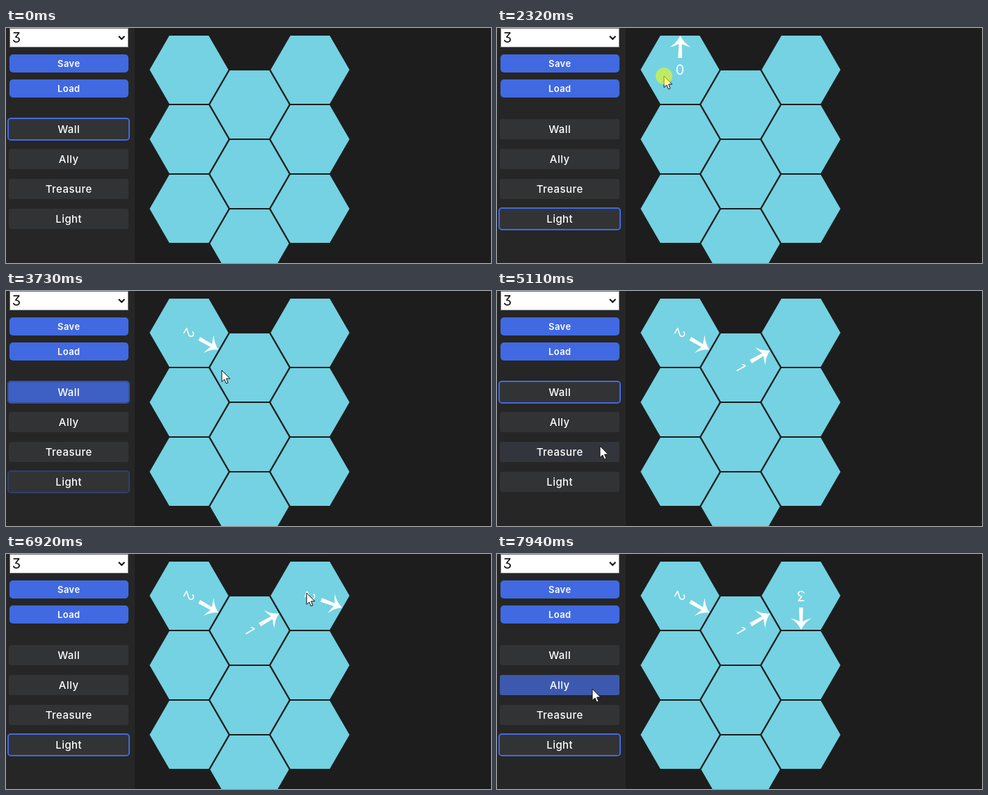
These frames come from a looping animation (697 px wide and 338 px high, 8000 ms). An HTML page:

```html
<!DOCTYPE html>
<html lang="en">
<head>
<meta charset="utf-8">
<title>Hex board editor</title>
<style>
  html, body { margin: 0; width: 100%; height: 100%; overflow: hidden; background: #1d1d1d; }
  svg { display: block; width: 697px; height: 338px; }
  text { font-family: Inter, "Open Sans", sans-serif; font-feature-settings: "cv09"; fill: #fff; text-anchor: middle; }
  .action { font-size: 13px; font-weight: 600; letter-spacing: .45px; }
  .tool { font-size: 15px; font-weight: 500; letter-spacing: .45px; }
  .digit { font-size: 20px; }
</style>
</head>
<body>
<svg id="stage" viewBox="0 0 697 338"></svg>
<script>
const LOOP = 8000;
const FADE = 500;
const TURN = 350;
const RING = 140;
const BLUE = '#4169e1';
const stage = document.getElementById('stage');

function add(tag, attrs, parent = stage, content = '') {
  const el = document.createElementNS('http://www.w3.org/2000/svg', tag);
  for (const key in attrs) el.setAttribute(key, attrs[key]);
  el.textContent = content;
  parent.appendChild(el);
  return el;
}

const show = (el, on) => el.setAttribute('visibility', on ? 'visible' : 'hidden');
const move = (el, x, y, angle = 0) =>
  el.setAttribute('transform', `translate(${x} ${y}) rotate(${angle})`);

function smooth(p) {
  p = Math.min(1, Math.max(0, p));
  return p * p * (3 - 2 * p);
}

// Board
const cell = (col, row = 0) => [263 + 87 * col, 60 + 100 * row + 50 * (col % 2)];
add('rect', { width: 697, height: 338, fill: '#1d1d1d' });
for (let i = 0; i < 9; i++) {
  const hex = add('path', { d: 'M-56.6 0L-28.3-49H28.3L56.6 0 28.3 49H-28.3Z', fill: '#74d2e2' });
  move(hex, ...cell(i % 3, Math.floor(i / 3)));
}

// Sidebar
add('rect', { width: 185, height: 338, fill: '#262626' });
add('rect', { x: 5.5, y: .5, width: 170, height: 27, fill: '#fff', stroke: '#767676' });
add('text', { class: 'digit', x: 15, y: 21, style: 'fill:#111' }, stage, '3');
add('path', { d: 'M162 11.8L166.2 16L170.4 11.8', fill: 'none', stroke: '#111', 'stroke-width': 2 });

['Save', 'Load'].forEach((label, i) => {
  const y = 38 + 36 * i;
  add('rect', { x: 5, y, width: 171, height: 26, rx: 5, fill: BLUE });
  add('text', { class: 'action', x: 90.3, y: y + 18 }, stage, label);
});

const tools = ['Wall', 'Ally', 'Treasure', 'Light'].map((label, i) => {
  const y = 131 + 43 * i;
  const box = { x: 4, y, width: 172, height: 29, rx: 3 };
  add('rect', { ...box, fill: '#323335' });
  const glow = add('rect', { ...box, fill: BLUE });
  const frame = add('rect', {
    x: 3, y: y - 1, width: 174, height: 31, rx: 4,
    fill: 'none', stroke: BLUE, 'stroke-width': 2
  });
  add('text', { class: 'tool', x: 90.2, y: y + 20 }, stage, label);
  return { label, y, glow, frame };
});

// Tool choices, by time of click
const choices = [
  { tool: 'Wall', at: -FADE },
  { tool: 'Light', at: 1260 },
  { tool: 'Wall', at: 3440 },
  { tool: 'Light', at: 5540 }
];

// One arrow per column; every turn adds 60 degrees
const lights = [
  { born: 2050, turns: [2300, 2620] },
  { born: 4000, turns: [4260] },
  { born: 6120, turns: [6390, 6660, 7190] }
];
for (const light of lights) {
  light.group = add('g', {});
  add('path', {
    d: 'M0-49Q5-38.5 15-32.5Q7-34.5 2.2-37L2.9-17H-2.9L-2.2-37Q-7-34.5-15-32.5Q-5-38.5 0-49Z',
    fill: '#fff'
  }, light.group);
  light.digit = add('text', { class: 'digit', y: 7 }, light.group);
}

const clicks = [
  ...choices.map(choice => choice.at),
  ...lights.flatMap(light => [light.born, ...light.turns])
];

const pointer = add('path', {
  d: 'M0 0V16.5L3.8 13L6.4 19L9 17.9L6.5 12H11.7Z',
  fill: '#fff', stroke: '#111', 'stroke-linejoin': 'round'
});
const ring = add('circle', { r: 12, fill: '#ff0', 'fill-opacity': .53 });

// Pointer stops: [arrive, leave, x, y]
const route = [
  [130, 130, 513, 62],
  [880, 880, 178, 283],
  [1150, 1400, 114, 277],
  [1700, 1700, 287, 107],
  [2080, 2780, 240, 69],
  [3120, 3120, 92, 179],
  [3340, 3540, 108, 149],
  [3725, 3725, 310, 114],
  [3940, 4720, 345, 112],
  [5110, 5110, 148, 223],
  [5380, 5650, 130, 275],
  [6090, 6450, 414, 60],
  [6800, 7250, 432, 56],
  [7740, LOOP, 137, 194]
];

function pointerAt(t) {
  const i = route.findIndex(stop => stop[0] > t);
  const [, , x1, y1] = route.at(i);
  if (i < 1) return [x1, y1];
  const [, leave, x0, y0] = route[i - 1];
  const k = smooth((t - leave) / (route[i][0] - leave));
  return [x0 + (x1 - x0) * k, y0 + (y1 - y0) * k];
}

function isOver(tool, t) {
  const [x, y] = pointerAt(t);
  return x >= 4 && x <= 176 && y >= tool.y && y <= tool.y + 29;
}

// A glow follows the share of the last FADE ms spent over the button
function glowAt(tool, t) {
  const samples = 50;
  let hits = 0;
  for (let i = 0; i < samples; i++) hits += isOver(tool, t - i * FADE / samples);
  return smooth(hits / samples);
}

function frameAt(tool, t) {
  const now = choices.findLastIndex(choice => choice.at <= t);
  const { tool: label, at } = choices[now];
  const p = smooth((t - at) / FADE);
  if (label === tool.label) return p;
  return now > 0 && choices[now - 1].tool === tool.label ? 1 - p : 0;
}

function draw(t) {
  for (const tool of tools) {
    tool.glow.setAttribute('opacity', glowAt(tool, t));
    tool.frame.setAttribute('opacity', frameAt(tool, t));
  }

  lights.forEach((light, col) => {
    const angle = light.turns.reduce((sum, start) => sum + 60 * smooth((t - start) / TURN), 0);
    move(light.group, ...cell(col), angle);
    light.digit.textContent = light.turns.filter(start => start + 60 <= t).length;
    show(light.group, t >= light.born);
  });

  const [x, y] = pointerAt(t);
  move(pointer, x, y);
  move(ring, x, y);
  show(pointer, t >= 130);
  show(ring, clicks.some(start => t >= start && t < start + RING));
}

const begin = performance.now();
function tick() {
  draw((performance.now() - begin) % LOOP);
  requestAnimationFrame(tick);
}
tick();
</script>
</body>
</html>
```
